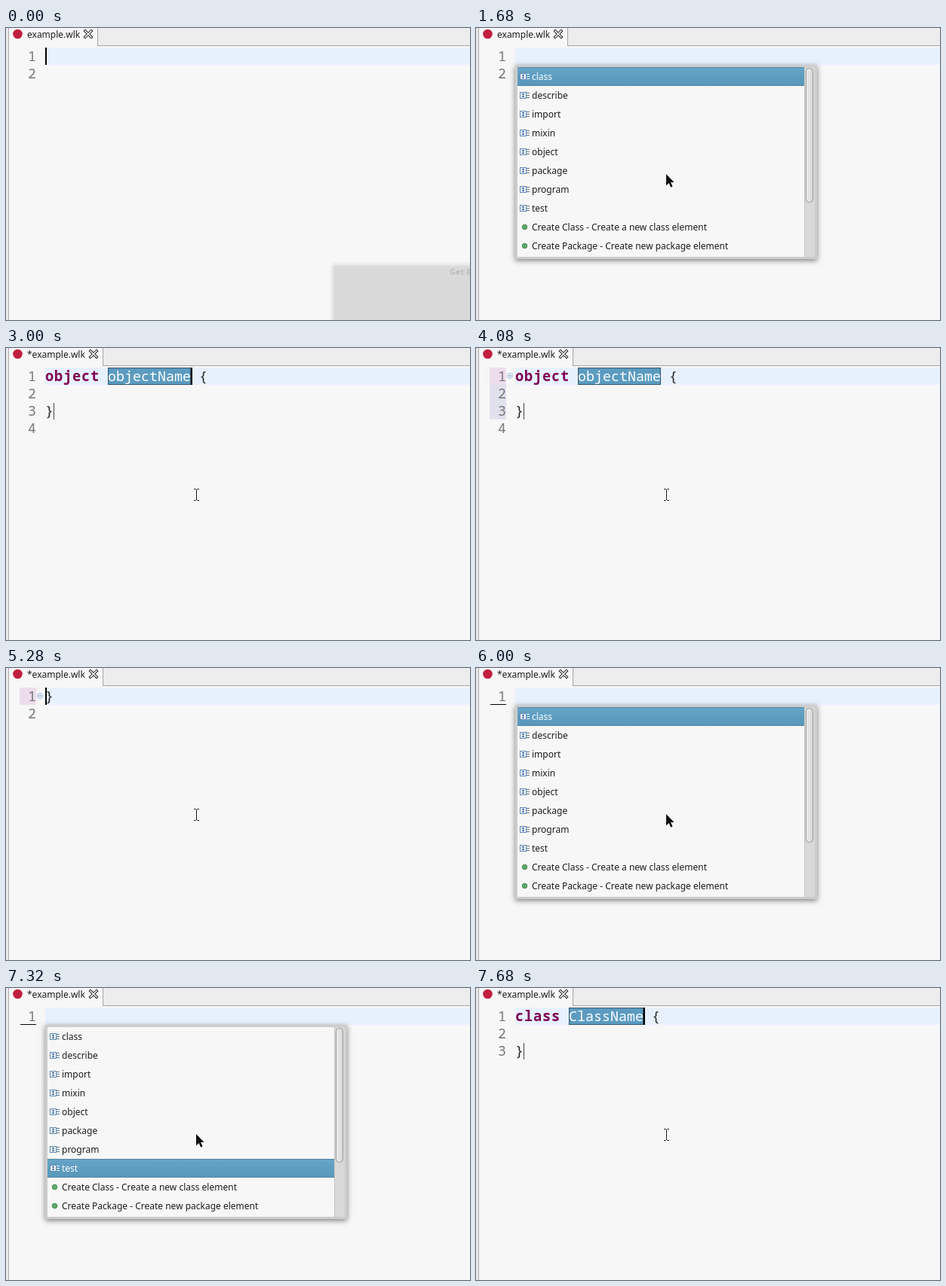
An HTML page with a canvas for the animation above (8000 ms loop, 615 by 388 pixels).

```html
<!DOCTYPE html>
<html lang="en">
<head>
<meta charset="utf-8">
<title>Editor content assist</title>
<style>
html, body { margin: 0; width: 100%; height: 100%; overflow: hidden; background: #f7f7f7; }
canvas { display: block; }
</style>
</head>
<body>
<canvas width="615" height="388"></canvas>
<script>
const ctx = document.querySelector('canvas').getContext('2d');
const LOOP = 8000, LINE = 23, ROW = 25, CHAR = 11, LEFT = 52;
const UI = '12px "Noto Sans", sans-serif';
const CODE = '18.33px "Noto Sans Mono", monospace';
const CODE_BOLD = 'bold 18.67px "Noto Sans Mono", monospace';

const keywords = ['class', 'describe', 'import', 'mixin', 'object', 'package', 'program', 'test'];
const proposal = name => `WollokTemplateProposalProvider_${name}_name - WollokTemplateProposalProvider_${name}_description`;
const items = [...keywords,
  'Create Class - Create a new class element',
  'Create Package - Create new package element',
  'Create Program - Create wollok program',
  'Create Well-Known Object - Create a new global object',
  proposal('WSuite'), proposal('WTest')];

// [start, value] steps; the last one reached holds
const selection = [[720, 0], [1800, 13], [2280, 12], [2400, 11], [2520, 10], [2760, 11], [2880, -1],
  [5760, 0], [6480, 1], [6600, 2], [6720, 3], [6840, 4], [7080, 5], [7200, 6], [7320, 7], [7440, 8], [7680, -1]];
const caretOn = [[0, 1], [480, 0], [1080, 1], [1680, 0], [2280, 1], [4080, 0], [4680, 1],
  [6000, 0], [6600, 1], [7200, 0], [7680, 1]];
const documents = [
  [0, { lines: 2 }],
  [2880, { lines: 4, word: 'object', name: 'objectName', brace: 2 }],
  [3480, { lines: 4, word: 'object', name: 'objectName', brace: 2, bars: ['pink', 'blue', 'blue'], fold: true }],
  [5040, { lines: 3, brace: 1, bars: ['', 'blue'], fold: true }],
  [5280, { lines: 2, brace: 0, bars: ['pink'], fold: true }],
  [5400, { lines: 1, removed: true, fold: true }],
  [5760, { lines: 1, removed: true }],
  [7680, { lines: 3, word: 'class', name: 'ClassName', brace: 2 }]];
const at = (steps, t, start = -1) => steps.reduce((value, [from, next]) => t >= from ? next : value, start);

function rect(x, y, w, h, fill) {
  ctx.fillStyle = fill;
  ctx.fillRect(x, y, w, h);
}

function text(str, x, y, font, fill, align = 'left', spacing = 0) {
  ctx.font = font;
  ctx.fillStyle = fill;
  ctx.textAlign = align;
  ctx.letterSpacing = spacing + 'px';
  ctx.fillText(str, x, y);
}

function circle(x, y, r, fill, stroke) {
  ctx.beginPath();
  ctx.arc(x, y, r, 0, 7);
  ctx.fillStyle = fill;
  ctx.fill();
  if (stroke) {
    ctx.lineWidth = 1;
    ctx.strokeStyle = stroke;
    ctx.stroke();
  }
}

function strokePath(d, color, width) {
  ctx.strokeStyle = color;
  ctx.lineWidth = width;
  ctx.stroke(new Path2D(d));
}

function gradient(x0, y0, x1, y1, from, to) {
  const g = ctx.createLinearGradient(x0, y0, x1, y1);
  g.addColorStop(0, from);
  g.addColorStop(1, to);
  return g;
}

function drawTab(dirty) {
  const edge = dirty ? 128 : 121;
  rect(0, 0, 4, 388, '#e9e9e9');
  rect(3, 0, 1, 388, '#a9a9a9');
  rect(edge, 0, 615 - edge, 23, '#ededed');
  rect(edge, 23, 615 - edge, 1, '#a6a6a6');
  rect(edge, 0, 1, 24, '#a6a6a6');
  circle(15.5, 8, 6.3, '#c0203f');
  text((dirty ? '*' : '') + 'example.wlk', 28, 13, UI, '#1c1c1c');
  const x = edge - 16, cross = `M${x} 4l8 8m0-8l-8 8`;
  ctx.lineCap = 'square';
  strokePath(cross, '#222', 3.6);
  strokePath(cross, '#f7f7f7', 1.6);
  ctx.lineCap = 'butt';
}

function drawEditor(doc, caret) {
  rect(LEFT, 26, 615 - LEFT, LINE, '#e7f1fe');
  (doc.bars || []).forEach((kind, i) => {
    if (kind) rect(18, 26 + i * LINE, 22, LINE, kind == 'pink' ? '#edddec' : '#e1e1ee');
  });
  const base = i => 44 + i * LINE;
  for (let i = 0; i < doc.lines; i++) text(i + 1, 40, base(i), CODE, '#787878', 'right');
  if (doc.removed) rect(19, 48, 21, 1, '#000');
  if (doc.fold) {
    circle(45, 37, 3.5, '#eef3fa', '#a9bfd9');
    rect(43, 36.5, 4, 1, '#6f8fb5');
  }

  let x = LEFT;
  if (doc.word) {
    text(doc.word, x, base(0), CODE_BOLD, '#7f0055', 'left', .8);
    x += doc.word.length * 12 + CHAR;
    const w = doc.name.length * CHAR;
    rect(x, 26, w, LINE, '#5b9bc0');
    ctx.strokeStyle = '#35566b';
    ctx.lineWidth = 1;
    ctx.strokeRect(x + .5, 26.5, w - 1, LINE - 1);
    text(doc.name, x, base(0), CODE, '#fff');
    x += w;
    text('{', x + CHAR, base(0), CODE, '#222');
    rect(63, 73, 1, 22, '#444');
  }
  if (doc.brace >= 0) text('}', LEFT, base(doc.brace), CODE, '#222');
  if (caret) rect(x, 26, 2, LINE, '#000');
}

function thumb(x, y, w, h) {
  ctx.beginPath();
  ctx.roundRect(x + .5, y + .5, w - 1, h - 1, 4);
  ctx.fillStyle = w < h ? gradient(x, 0, x + w, 0, '#eee', '#d6d6d6') : gradient(0, y, 0, y + h, '#eee', '#d6d6d6');
  ctx.fill();
  ctx.strokeStyle = '#999';
  ctx.lineWidth = 1;
  ctx.stroke();
}

function keywordIcon(y, selected) {
  rect(58, y - 4, 9, 9, '#5d87ad');
  rect(59, y - 3, 7, 7, '#f4f8fc');
  rect(62, y - 2, 1, 5, '#2c5f9e');
  rect(61, y - 2, 3, 1, '#2c5f9e');
  rect(61, y + 2, 3, 1, '#2c5f9e');
  for (let i = 0; i < 3; i++) rect(67, y - 3 + i * 3, 4, 1, selected ? '#eef5fa' : '#66788a');
}

function drawPopup(selected, scrolled) {
  const x = 55, y = 52, w = 380, full = 252;
  const h = scrolled ? full - 14 : full, total = items.length * ROW;
  const offset = scrolled ? total - full : 0;
  ctx.save();
  ctx.shadowColor = 'rgba(0,0,0,.5)';
  ctx.shadowBlur = 7;
  ctx.shadowOffsetY = 2;
  rect(52, 49, 400, 258, '#cdcdcd');
  ctx.restore();
  rect(x, y, 394, full, '#d9d9d9');
  rect(x, y, w, h, '#f7f7f7');

  ctx.save();
  ctx.beginPath();
  ctx.rect(x, y, w, h);
  ctx.clip();
  items.forEach((item, i) => {
    const top = y + i * ROW - offset, mid = top + 12, on = i == selected;
    if (on) {
      rect(x, top, w, ROW, gradient(0, top, 0, top + ROW, '#67a5c8', '#5797b9'));
      rect(x, top, w, 1, '#5689a5');
      rect(x, top + ROW - 1, w, 1, '#5689a5');
    }
    if (i < keywords.length) keywordIcon(mid, on);
    else {
      circle(64.5, mid + .5, on ? 4 : 3.2, on ? '#5d9a6b' : '#5fae69', on ? '#eef6ee' : '#377d45');
    }
    text(item, 74, top + 17, UI, on ? '#fff' : '#1c1c1c');
  });
  ctx.restore();

  rect(435, y, 1, full, '#c4c4c4');
  thumb(437, Math.round(y + 1 + offset * h / total), 10, Math.round(h * h / total) - 2);
  if (scrolled) {
    rect(x, 290, w, 1, '#c4c4c4');
    thumb(56, 292, 241, 10);
  }
}

function drawPointer(arrow) {
  if (arrow) {
    const shape = new Path2D('M252 194v15.5l3.6-3.4 2.6 5.6 2.4-1.1-2.5-5.5h4.6z');
    ctx.strokeStyle = '#fff';
    ctx.lineWidth = 2;
    ctx.stroke(shape);
    ctx.fillStyle = '#111';
    ctx.fill(shape);
  } else {
    const beam = 'M249 187.5h2.5l1 1 1-1h2.5M252.500 188v14M249 202.500h2.5l1-1 1 1h2.5';
    strokePath(beam, '#fff', 3);
    strokePath(beam, '#111', 1);
  }
}

function drawNotice(alpha) {
  ctx.save();
  ctx.globalAlpha = alpha;
  ctx.shadowColor = 'rgba(0,0,0,.6)';
  ctx.shadowBlur = 5;
  rect(433, 314, 200, 90, '#d6d6d6');
  ctx.shadowColor = 'transparent';
  rect(433, 314, 200, 1, '#fff');
  text('Get Ready', 588, 328, 'bold 11px "Noto Sans", sans-serif', '#555', 'left');
  ctx.restore();
}

function draw() {
  const t = performance.now() % LOOP;
  rect(0, 0, 615, 388, '#f7f7f7');
  drawTab(t >= 3000);
  drawEditor(at(documents, t), at(caretOn, t));
  if (t < 360) drawNotice(.2 - Math.floor(t / 120) * .07);
  const selected = at(selection, t);
  if (selected >= 0) drawPopup(selected, t >= 1800 && t < 2880);
  if (t >= 360) drawPointer(selected >= 0);
  requestAnimationFrame(draw);
}
draw();
</script>
</body>
</html>
```
